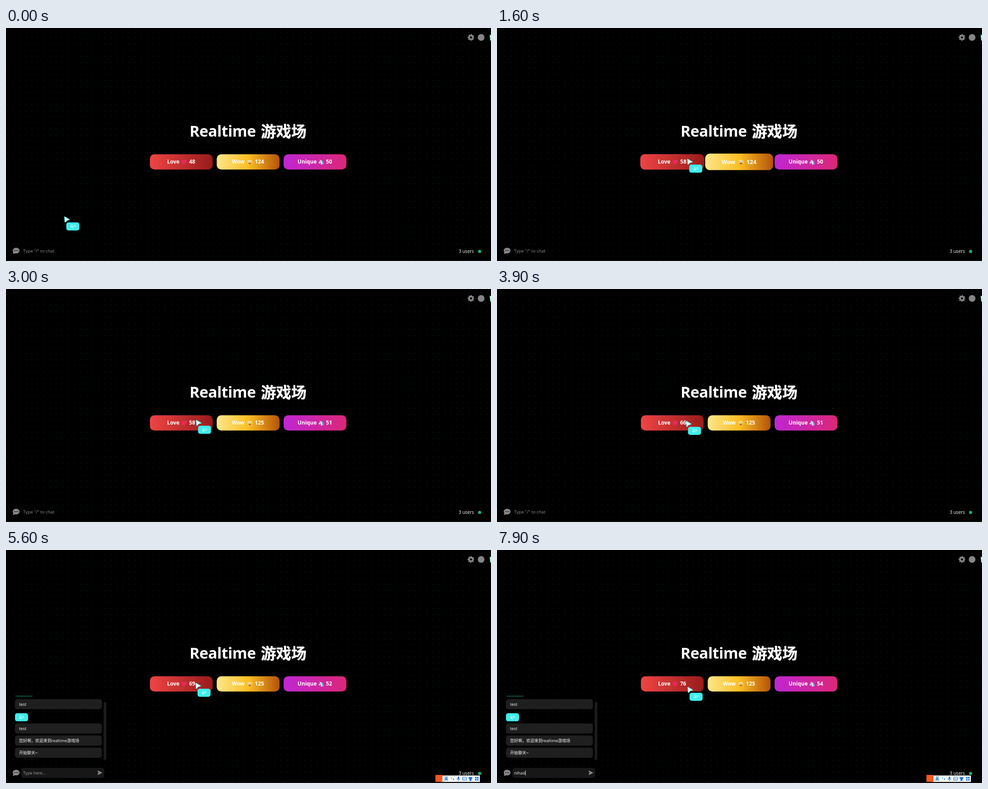
Animation, 1078 px wide and 519 px high, one loop 8 s. Source, as an HTML page:

```html
<!DOCTYPE html>
<html lang="zh">
<head>
<meta charset="utf-8">
<title>Realtime</title>
<style>
html, body { margin: 0; width: 100%; height: 100%; overflow: hidden; background: #000; }
svg { display: block; width: 1078px; height: 519px; }
text { font-family: "Open Sans", "Noto Sans CJK SC", "Noto Sans CJK", "Noto Sans", sans-serif; font-size: 9.3px; fill: #fff; white-space: pre; }
.title { font-size: 33.8px; font-weight: 700; }
.latin { letter-spacing: -.5px; }
.heavy { font-weight: 900; stroke: #fff; stroke-width: .5; }
.button text { font-size: 11.85px; font-weight: 700; }
.name { font-size: 6.6px; font-weight: 700; text-anchor: middle; }
.tag { fill: #3eeeec; }
.message { fill: #1f1f1f; }
.hint { font-size: 9.8px; fill: #929292; }
.here { fill: #a3a3a3; }
.cjk { font-size: 9px; font-weight: 500; }
</style>
</head>
<body>
<svg viewBox="0 0 1078 519">
  <defs>
    <pattern id="dots" x="-3.25" y="2.25" width="13.5" height="13.5" patternUnits="userSpaceOnUse">
      <circle cx="6.75" cy="6.75" r=".8" fill="#0a3424"/>
    </pattern>
    <linearGradient id="red"><stop stop-color="#ef4444"/><stop offset="1" stop-color="#991b1b"/></linearGradient>
    <linearGradient id="gold"><stop stop-color="#fde68a"/><stop offset=".5" stop-color="#fbbf24"/><stop offset="1" stop-color="#b45309"/></linearGradient>
    <linearGradient id="pink"><stop stop-color="#c026d3"/><stop offset="1" stop-color="#db2777"/></linearGradient>
    <clipPath id="list"><rect x="15" y="324" width="215" height="150"/></clipPath>
    <path id="arrow" d="M.6 1.1Q.5 .1 1.5 .6L11.3 6.3Q12.3 7.1 11 7.5L6.4 8.6L3 12.4Q1.7 13.4 1.5 12Z" fill="#fff" stroke-width="1.1" stroke-linejoin="round"/>
    <path id="plane" d="M0 0L10.5 5L0 10L1.4 5.8L6 5L1.4 4.2Z" fill="#9a9a9a"/>
  </defs>

  <rect width="1078" height="519"/>
  <rect width="1078" height="519" fill="url(#dots)"/>
  <path d="M4 518.5H1078" stroke="#1c1c1c"/>

  <g transform="translate(1033.5 21)">
    <circle r="4.1" fill="none" stroke="#858585" stroke-width="3.6"/>
    <circle r="6.3" fill="none" stroke="#858585" stroke-width="2.6" stroke-dasharray="2.7 2.25" stroke-dashoffset="1.35"/>
  </g>
  <circle cx="1056" cy="21" r="7.5" fill="#858585"/>
  <use href="#arrow" x="1075" y="15" stroke="#4ade9f"/>

  <text class="title latin" x="408" y="242">Realtime</text>
  <text class="title heavy" x="566.5" y="243">游戏场</text>

  <g id="buttons"></g>

  <g id="bubble" fill="#8a8a8a">
    <ellipse cx="22.5" cy="495.8" rx="7.6" ry="6.3"/>
    <path d="M16.5 498L15.3 503.2Q19 503 21.5 500.5Z"/>
    <g fill="#000"><circle cx="19" cy="495.8" r="1"/><circle cx="22.5" cy="495.8" r="1"/><circle cx="26" cy="495.8" r="1"/></g>
  </g>
  <text id="hint" class="hint" x="38" y="500">Type "/" to chat</text>

  <g id="entry">
    <rect id="field" x="34" y="485.3" width="184" height="22.4" rx="5" fill="#171717"/>
    <text id="typed" x="38" y="500"></text>
    <use id="send" href="#plane" y="491.3"/>
    <rect id="caret" y="491" width="1" height="11" fill="#fff"/>
  </g>

  <g clip-path="url(#list)">
    <g id="panel">
      <rect x="20" y="310" width="40" height="17.6" rx="5" fill="#06382c"/>
      <g id="messages"></g>
      <rect x="20" y="363.6" width="29" height="18" rx="5" class="tag"/>
      <text class="name" x="34.5" y="375">云7</text>
      <rect x="217" y="338.6" width="6" height="128.6" rx="3" fill="#1c1c1c"/>
    </g>
  </g>

  <text x="1006" y="500.7" style="font-size:10.1px">3 users</text>
  <circle id="ring" cx="1052.7" cy="497.7" fill="#10b981"/>
  <circle cx="1052.7" cy="497.7" r="3.4" fill="#10b981"/>

  <g id="ime">
    <rect x="966" y="502.3" width="87.3" height="14.3" fill="#fff"/>
    <rect x="954.5" y="501" width="15.5" height="15.5" fill="#f4581f"/>
    <g fill="#1670cf" stroke="#1670cf" stroke-width="0">
      <text x="974" y="513" style="font-size:9px;font-weight:700;fill:inherit">英</text>
      <circle cx="990" cy="508" r="1.1"/><path d="M993.5 509h2.2v1.5l-1.5 2.2h-.8l.6-1.7h-.5z"/>
      <rect x="1003.9" y="504.7" width="3.4" height="6" rx="1.7"/>
      <path d="M1002.2 509q0 3.3 3.4 3.3t3.4-3.3M1005.6 512.3v2.2" fill="none" stroke-width="1"/>
      <rect x="1015" y="506" width="8.6" height="7" rx="1" fill="none" stroke-width="1.2"/>
      <path d="M1016.5 508.4h6M1016.5 510.8h6" stroke-width="1" stroke-dasharray="1.2 .8"/>
      <path d="M1030.5 505.4q2 1.6 4 0l2.7 1.9-1.3 2.4-1.2-.5v5h-4.6v-5l-1.2 .5-1.3-2.4z"/>
      <path d="M1042.5 505.6h3.4v3.4h-3.4zM1047 505.6h3.4v3.4h-3.4zM1042.5 510.2h3.4v3.4h-3.4zM1047 510.2h3.4v3.4h-3.4z"/>
    </g>
  </g>

  <g id="cursor">
    <use href="#arrow" stroke="#3eeeec"/>
    <rect x="4.7" y="13" width="29" height="18" rx="5" class="tag"/>
    <text class="name" x="19.2" y="24.4">云7</text>
  </g>
</svg>

<script>
const LOOP = 8000;
const $ = id => document.getElementById(id);
const set = (el, attrs) => { for (const k in attrs) el.setAttribute(k, attrs[k]); };
const clamp = x => Math.min(1, Math.max(0, x));
const phase = (t, from, to) => clamp((t - from) / (to - from));
const easeOut = x => 1 - (1 - x) ** 2;
const smooth = x => x * x * (3 - 2 * x);
const show = (el, on) => set(el, { visibility: on ? "visible" : "hidden" });

const heart = `<path d="M0 5.3C-7.6 .3-6-5.3-2.8-5.3Q-.8-5.3 0-3.3Q.8-5.3 2.8-5.3C6-5.3 7.6 .3 0 5.3Z" fill="#f0245a"/>
  <path d="M-5 4.8L-3 3M2-1.6L5-4.6" stroke="#6f7488" stroke-width="1"/>`;
const face = `<circle r="5.4" fill="#fbcb47"/><circle cx="-2.2" cy="-1.7" r="2.2" fill="#fff"/><circle cx="2.3" cy="-1.6" r="1.7" fill="#fff"/>
  <circle cx="-1.9" cy="-1.5" r=".9" fill="#54351d"/><circle cx="2.3" cy="-1.4" r=".8" fill="#54351d"/>
  <path d="M-3 1.3Q0 2.6 3 1.3Q2.5 4.4 0 4.4T-3 1.3Z" fill="#664222"/><path d="M-.8 2.4h2.8v2.2q-1.4 1.6-2.8 0z" fill="#e8596e"/>`;
const unicorn = `<path d="M-1.5-2.8L-3.8-6L.3-3.8Z" fill="#f2c14e"/><path d="M-1.5-3.8Q5-4.5 5.5 5.5H-.5L0 1.5L-3.8 3.5Q-5.8 3-5 1Z" fill="#d5dfea"/>
  <path d="M0-4.6Q6.5-4 5.8 5.5H3.2Q4.2-.5 0-4.6Z" fill="#6d9be8"/><circle cx="-1.6" cy="-.6" r=".7" fill="#292f33"/>`;

// counts: [from, to, end value]; pops: [from, to]
const buttons = [
  { label: "Love", fill: "red", x: 319.8, textX: 358, iconX: 396, numX: 407, icon: heart, start: 48,
    counts: [[650, 1000, 56], [1300, 1600, 58], [3000, 3700, 66], [5250, 6400, 76]], pops: [[1300, 1620]] },
  { label: "Wow", fill: "gold", x: 468.4, textX: 502, iconX: 542, numX: 553.3, icon: face, start: 124,
    counts: [[1900, 2000, 125]], pops: [[1380, 1700], [1820, 2300]] },
  { label: "Unique", fill: "pink", x: 617, textX: 648, iconX: 700, numX: 711.3, icon: unicorn, start: 50,
    counts: [[2300, 2400, 51], [5250, 6250, 54]], pops: [[2120, 2600], [3100, 3600]] },
];
$("buttons").innerHTML = buttons.map(b => `<g class="button">
  <rect x="${b.x}" y="281.2" width="139.6" height="34" rx="10" fill="url(#${b.fill})"/>
  <text x="${b.textX}" y="302.4">${b.label}</text>
  <g transform="translate(${b.iconX} 298.6)">${b.icon}</g>
  <text x="${b.numX}" y="302.4"></text></g>`).join("");
buttons.forEach((b, i) => {
  b.el = $("buttons").children[i];
  b.num = b.el.lastElementChild;
});

$("messages").innerHTML = [[332.2, "test"], [386.3, "test"], [413.3, "您好啊，欢迎来到realtime游戏场"], [440.3, "开始聊天~"]]
  .map(([y, s]) => `<rect class="message" x="20" y="${y}" width="193" height="22.4" rx="5"/>
    <text x="29" y="${y + 14.5}"${s === "test" ? "" : ' class="cjk"'}>${s}</text>`).join("");

// [from, to, x, y]
const origin = [129.3, 420];
const moves = [[400, 850, 425.3, 290], [1300, 1700, 422.1, 291.6], [3000, 3700, 419.8, 294],
  [5300, 6400, 426.2, 305], [7300, 7800, 423.3, 305]];

function countAt(b, t) {
  let value = b.start;
  for (const [from, to, end] of b.counts) value += Math.floor((end - value) * phase(t, from, to));
  return value;
}

function drawButtons(t) {
  for (const b of buttons) {
    const pop = Math.max(...b.pops.map(([from, to]) => Math.sin(Math.PI * phase(t, from, to))));
    const cx = b.x + 69.8, s = 1 + .1 * pop;
    set(b.el, { transform: `translate(${cx} 298.2) scale(${s}) translate(${-cx} -298.2)` });
    b.num.textContent = countAt(b, t);
  }
}

function drawCursor(t) {
  let [x, y] = origin;
  for (const [from, to, endX, endY] of moves) {
    const p = smooth(phase(t, from, to));
    x += (endX - x) * p;
    y += (endY - y) * p;
  }
  set($("cursor"), { transform: `translate(${x} ${y})` });
}

function drawStatus(t) {
  const p = phase((t + 135) % 1335, 600, 1100);
  set($("ring"), { r: 3.4 + 2.6 * easeOut(p), opacity: p ? .6 - .3 * p : 0 });
}

function drawChat(t) {
  const p = easeOut(phase(t, 4800, 5400)), open = t >= 4800;
  const width = 128 + 56 * p;
  const text = "nihao".slice(0, Math.ceil(5 * phase(t, 7300, 7800)));
  show($("hint"), !open);
  show($("entry"), open);
  show($("ime"), open);
  set($("bubble"), { fill: t >= 4600 && t < 5500 ? "#fff" : "#8a8a8a" });
  set($("panel"), { opacity: p, transform: `translate(0 ${9.2 * (1 - p)})` });
  set($("field"), { width });
  set($("send"), { x: 19.5 + width });
  $("typed").textContent = text || "Type here...";
  set($("typed"), { class: text ? "" : "here" });
  const caretX = text ? 38 + $("typed").getComputedTextLength() : 38;
  const blinkOn = text || Math.floor((t - 4900) / 500) % 2 === 0;
  set($("caret"), { x: caretX, opacity: blinkOn ? 1 : 0 });
}

const begin = performance.now();
function frame() {
  const t = (performance.now() - begin) % LOOP;
  drawButtons(t);
  drawCursor(t);
  drawStatus(t);
  drawChat(t);
  requestAnimationFrame(frame);
}
frame();
</script>
</body>
</html>
```
